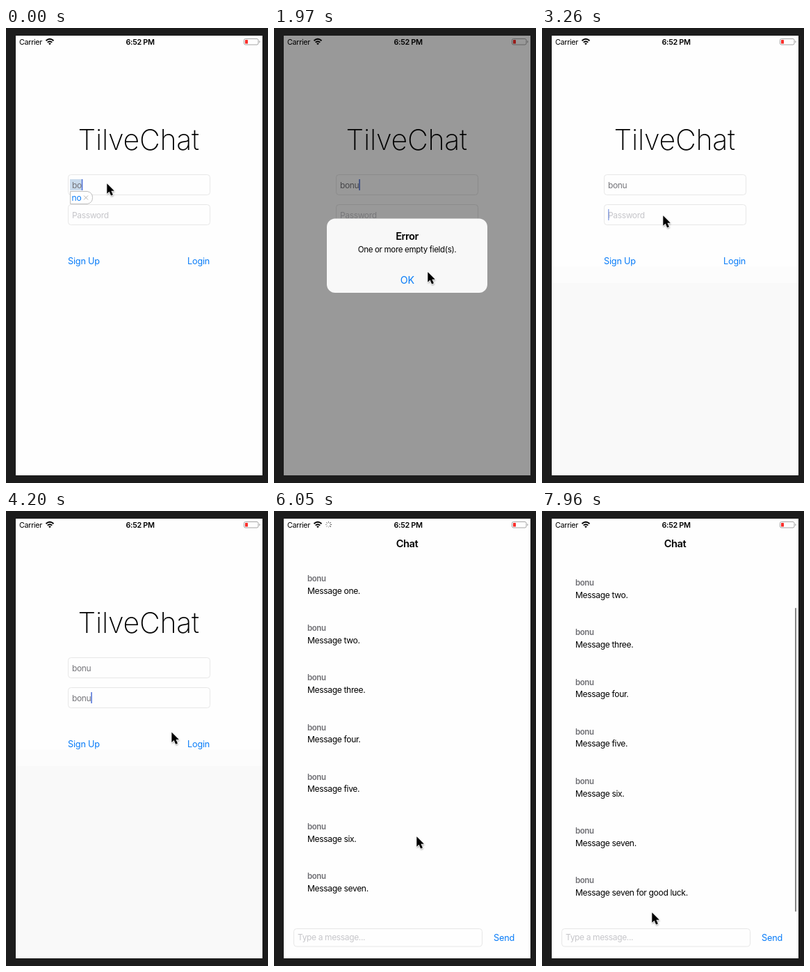
These frames come from a looping animation (377 by 653 pixels, 8000 ms). An HTML page:

```html
<!DOCTYPE html>
<html lang="en">
<head>
<meta charset="utf-8">
<title>Chat sign-in</title>
<style>
  html, body { margin: 0; width: 100%; height: 100%; overflow: hidden; background: #1c1c1c; }
  svg { display: block; width: 377px; height: 653px; }
  text { font-family: Inter, Roboto, sans-serif; letter-spacing: -.03em; white-space: pre; }
  .status { font-size: 10.8px; }
  .title { font-size: 41px; font-weight: 200; letter-spacing: -.2px; }
  .field { font-size: 12px; fill: #75757a; }
  .hint { font-size: 12px; fill: #c6c6ca; }
  .link { font-size: 12.7px; letter-spacing: -.015em; fill: #087cf8; }
  .heading { font-size: 14.6px; font-weight: 600; }
  .sender { font-size: 11.4px; font-weight: 600; fill: #6f6f74; }
  .message { font-size: 12.1px; }
  .box { fill: #fefefe; stroke: #e7e7e7; }
  .mid { text-anchor: middle; }
</style>
</head>
<body>
<svg viewBox="0 0 377 653">
  <defs>
    <clipPath id="screen"><rect x="14" y="11" width="355" height="631"/></clipPath>
    <clipPath id="listArea"><rect x="14" y="79" width="355" height="504"/></clipPath>
    <filter id="soft" x="-50%" y="-50%" width="200%" height="200%"><feGaussianBlur stdDeviation=".9"/></filter>
    <path id="arrow" d="M0 0V14.5L3.3 11.5 5.8 17.2 8.6 16 6.1 10.5H10.5Z"/>
  </defs>
  <rect width="377" height="653" fill="#1c1c1c"/>
  <g clip-path="url(#screen)">
    <rect x="14" y="11" width="355" height="631" fill="#fefefe"/>
    <g id="shade">
      <rect x="14" y="342" width="355" height="25" fill="#fcfcfc"/>
      <rect x="14" y="366" width="355" height="276" fill="#f9f9f9"/>
    </g>

    <text class="title mid" x="190.7" y="175">TilveChat</text>
    <rect class="box" x="89.5" y="210.5" width="204" height="29" rx="4"/>
    <rect class="box" x="89.5" y="253.5" width="204" height="29" rx="4"/>
    <rect id="marked" x="92" y="217" width="17" height="16" fill="#c9daec"/>
    <text id="user" class="field" x="95" y="229.5"></text>
    <text id="passHint" class="hint" x="95" y="272.5">Password</text>
    <text id="pass" class="field" x="95" y="272.5"></text>
    <rect id="caret" width="1.5" height="16" fill="#4c6fd6"/>
    <g id="suggestion">
      <path d="M92.5 234.5H117Q124.5 236 124.5 243.5T117 252.5H92.5Z" fill="#fff" stroke="#bdbdbd"/>
      <text class="link" x="94.5" y="248" style="font-size:12px">no</text>
      <path d="M112 240.5l6 6m0-6l-6 6" stroke="#b4b4b4" fill="none"/>
    </g>
    <text class="link" x="89" y="339.3">Sign Up</text>
    <text class="link" x="293.2" y="339.3" text-anchor="end">Login</text>

    <g id="chat">
      <rect id="sheet" x="14" y="11" width="355" height="631"/>
      <rect x="74" y="11" width="220" height="228" fill="#fefefe"/>
      <text class="heading mid" x="191.5" y="52">Chat</text>
      <g clip-path="url(#listArea)"><g id="rows"></g></g>
      <rect id="scrollbar" x="364" width="2" rx="1" fill="#858585"/>
      <rect class="box" x="28.5" y="599.5" width="271" height="25.5" rx="4"/>
      <text class="hint" x="34" y="616">Type a message...</text>
      <text class="link" x="316" y="616.5">Send</text>
    </g>

    <text class="status" x="19" y="23.5">Carrier</text>
    <g fill="none" stroke="#000" stroke-width="1.9">
      <path d="M57.5 18.3Q63 13.2 68.5 18.3M59.7 20.6Q63 17.7 66.3 20.6"/>
      <path d="M63 24.2l-1.9-2q1.9-1.4 3.8 0z" fill="#000" stroke="none"/>
    </g>
    <g id="spinner" stroke="#555"></g>
    <text class="status mid" x="193" y="23.5" font-weight="600">6:52 PM</text>
    <rect x="342.5" y="15.5" width="20.5" height="8.5" rx="2" fill="none" stroke="#a5a5a5"/>
    <rect x="344" y="17" width="4" height="5.5" rx=".6" fill="#fb2f2b"/>
    <path d="M364.3 18v3.5q1.3-.5 1.3-1.75t-1.3-1.75" fill="#a5a5a5"/>

    <g id="alert">
      <rect x="14" y="11" width="355" height="631" opacity=".4"/>
      <g id="dialog">
        <rect x="76" y="273.5" width="231" height="106.5" rx="12" fill="#f8f8f8"/>
        <text class="heading mid" x="191.5" y="304">Error</text>
        <text class="mid" x="191.5" y="321.5" font-size="11.6">One or more empty field(s).</text>
        <text class="link mid" x="191.8" y="366.5" style="font-size:14.2px">OK</text>
      </g>
    </g>
  </g>
  <g id="pointer">
    <use href="#arrow" x=".8" y="1.6" stroke="#000" opacity=".4" filter="url(#soft)"/>
    <use href="#arrow" x=".3" y=".3" stroke="#fff" stroke-width="1.6" paint-order="stroke"/>
  </g>
</svg>
<script>
const LOOP = 8000;
const ROW = 71.2, REST = 65, PULLED = 106, SHEET = 631;
const NAME = 'bonu';
const ui = Object.fromEntries([...document.querySelectorAll('[id]')].map(node => [node.id, node]));

const clamp = v => Math.min(1, Math.max(0, v));
const ramp = (t, from, to) => clamp((t - from) / (to - from));
const smooth = p => p * p * (3 - 2 * p);
const easeOut = p => 1 - (1 - p) ** 3;
const between = (t, from, to) => t >= from && t < to;
const show = (node, on) => { node.style.display = on ? '' : 'none'; };
const set = (node, attrs) => Object.entries(attrs).forEach(([k, v]) => node.setAttribute(k, v));
const typed = (t, times) => NAME.slice(0, times.filter(at => t >= at).length);

function add(parent, tag, attrs, text = '') {
  const node = document.createElementNS('http://www.w3.org/2000/svg', tag);
  set(node, attrs);
  node.textContent = text;
  return parent.appendChild(node);
}

['one', 'two', 'three', 'four', 'five', 'six', 'seven', 'seven for good luck'].forEach((word, i) => {
  add(ui.rows, 'text', { class: 'sender', x: 48, y: 101 + i * ROW }, NAME);
  add(ui.rows, 'text', { class: 'message', x: 48, y: 118.5 + i * ROW }, `Message ${word}.`);
});

const petals = Array.from({ length: 8 }, (_, i) =>
  add(ui.spinner, 'path', { d: 'M0-2.2V-4.7', transform: `translate(78.5 19.5) rotate(${i * 45})` }));

// time, x, y of the pointer tip
const pointerPath = [
  [250, 145, 223], [700, 295, 326], [860, 284, 331], [1560, 284, 331],
  [1970, 221, 350], [2030, 214, 352], [2090, 214, 352], [2200, 195, 356],
  [2330, 195, 356], [2700, 174, 269], [3960, 174, 269], [4330, 263, 336],
  [4480, 266, 331], [5520, 266, 331], [6050, 205, 467], [6340, 205, 467],
  [6650, 330, 580], [7120, 200, 452], [7180, 200, 452], [7420, 189, 302],
  [7470, 189, 302], [7960, 158, 576]
];

function pointerAt(t) {
  const next = pointerPath.findIndex(key => key[0] > t);
  if (next === 0) return pointerPath[0].slice(1);
  if (next < 0) return pointerPath.at(-1).slice(1);
  const [t0, x0, y0] = pointerPath[next - 1], [t1, x1, y1] = pointerPath[next];
  const p = smooth(ramp(t, t0, t1));
  return [x0 + (x1 - x0) * p, y0 + (y1 - y0) * p];
}

function drawLogin(t) {
  ui.user.textContent = typed(t, [0, 0, 180, 320]);
  ui.pass.textContent = typed(t, [3500, 3620, 3940, 4060]);
  show(ui.passHint, t < 3500);
  show(ui.marked, t < 180);
  show(ui.suggestion, t < 180);
  show(ui.shade, between(t, 2600, 5560));

  const onPass = t >= 2640;
  const input = onPass ? ui.pass : ui.user;
  const width = input.textContent ? input.getComputedTextLength() : 0;
  const blink = (off, on) => 1 - ramp(t, off, off + 100) * (1 - ramp(t, on, on + 60));
  set(ui.caret, {
    x: 95 + width,
    y: onPass ? 260 : 217,
    opacity: blink(890, 1270) * blink(3220, 3440)
  });
}

function drawAlert(t) {
  const enter = smooth(ramp(t, 1290, 1660));
  const scale = 1.15 - .15 * enter;
  set(ui.alert, { opacity: enter * (1 - smooth(ramp(t, 2260, 2640))) });
  set(ui.dialog, { transform: `translate(191.5 326.75) scale(${scale}) translate(-191.5 -326.75)` });
}

function drawChat(t) {
  show(ui.chat, t >= 5015);
  set(ui.chat, { transform: `translate(0 ${SHEET * (1 - easeOut(ramp(t, 5015, 5560)))})` });
  set(ui.sheet, { fill: t < 5400 ? '#f9f9f9' : '#fefefe' });
  show(ui.rows, t >= 5800);

  const pull = PULLED * smooth(ramp(t, 7180, 7420));
  const scroll = pull - (PULLED - REST) * easeOut(ramp(t, 7465, 7850));
  const top = 82 + Math.min(scroll, REST) * 57 / REST + Math.max(0, scroll - REST);
  set(ui.rows, { transform: `translate(0 ${-scroll})` });
  set(ui.scrollbar, {
    y: top,
    height: Math.min(436, 575 - top),
    opacity: ramp(t, 7180, 7240)
  });
}

function drawSpinner(t) {
  show(ui.spinner, between(t, 4720, 7160));
  const step = Math.floor(t / 100);
  petals.forEach((petal, i) => set(petal, { opacity: .3 + .7 * ((i - step + 800) % 8) / 7 }));
}

function draw(t) {
  drawLogin(t);
  drawAlert(t);
  drawChat(t);
  drawSpinner(t);
  set(ui.pointer, { transform: `translate(${pointerAt(t).join(' ')})` });
}

const start = performance.now();
function tick() {
  draw((performance.now() - start) % LOOP);
  requestAnimationFrame(tick);
}
tick();
</script>
</body>
</html>
```
